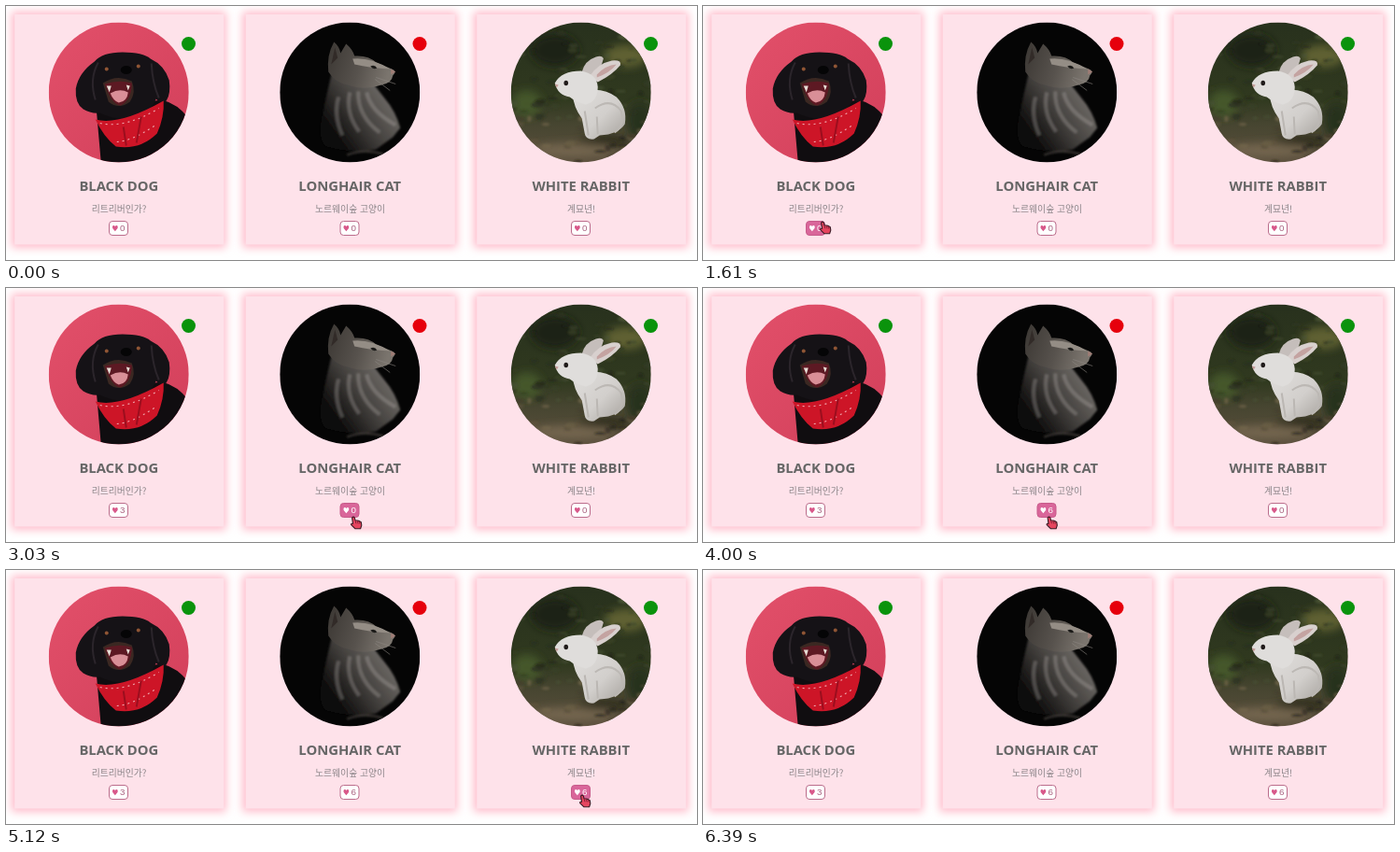
An HTML page for the animation above (6420 ms loop, 740 by 272 pixels).

```html
<!DOCTYPE html>
<html lang="ko">
<head>
<meta charset="utf-8">
<title>Pet cards</title>
<style>
  html, body { margin: 0; width: 100%; height: 100%; overflow: hidden; background: #fff; }
  svg { display: block; width: 740px; height: 272px; }
  text { text-anchor: middle; }
  .title { font: bold 14.8px "Open Sans", "Noto Sans", sans-serif; fill: #666; }
  .note { font: 9.8px "Noto Sans CJK KR", "Noto Sans CJK", "Noto Sans CJK JP", sans-serif; fill: #8a8488; }
  .box { fill: #fff; stroke: #bb6c8b; }
  .heart { fill: #d8588a; }
  .count { font: 9.8px "Liberation Sans", Arial, sans-serif; fill: #a9617f; }
  .hover .box { fill: #d9669a; stroke: #c75b8a; }
  .hover .heart, .hover .count { fill: #fff; }
</style>
</head>
<body>
<svg viewBox="0 0 740 272">
  <defs>
    <clipPath id="round"><circle r="75"/></clipPath>
    <filter id="glow" x="-15%" y="-15%" width="130%" height="130%"><feGaussianBlur stdDeviation="5"/></filter>
    <filter id="soft" x="-40%" y="-40%" width="180%" height="180%"><feGaussianBlur stdDeviation="5"/></filter>
    <filter id="fuzzy"><feGaussianBlur stdDeviation="1"/></filter>
    <linearGradient id="wall" x2="1" y2="1">
      <stop stop-color="#e2506a"/><stop offset="1" stop-color="#d23f5a"/>
    </linearGradient>
    <linearGradient id="fur" x1=".8" y1=".2" x2=".1" y2=".75">
      <stop stop-color="#75716d"/><stop offset=".5" stop-color="#45423f"/><stop offset="1" stop-color="#0b0a0a"/>
    </linearGradient>
    <linearGradient id="face" x2="1" y2=".2">
      <stop stop-color="#3b3733"/><stop offset=".55" stop-color="#57524d"/><stop offset="1" stop-color="#7b756e"/>
    </linearGradient>
    <linearGradient id="garden" x2="0" y2="1">
      <stop stop-color="#28311d"/><stop offset=".55" stop-color="#30391f"/>
      <stop offset=".72" stop-color="#464530"/><stop offset="1" stop-color="#5c503e"/>
    </linearGradient>
    <linearGradient id="white" x2="1" y2="1">
      <stop stop-color="#e0dedc"/><stop offset=".55" stop-color="#d2cfcc"/><stop offset="1" stop-color="#a5a19c"/>
    </linearGradient>

    <g id="dog">
      <rect x="-75" y="-75" width="150" height="150" fill="url(#wall)"/>
      <path d="M-24 18 L-19 75 H75 V28 Q63 12 46 8Z" fill="#100d10"/>
      <path d="M-26 -33 Q-18 -43 4 -43 Q26 -43 34 -36 Q49 -29 54 -13 Q56 1 51 9 Q45 13 40 7 Q34 22 16 28 Q-5 30 -20 22 Q-30 23 -38 18 Q-47 12 -46 -4 Q-43 -21 -26 -33Z" fill="#151216"/>
      <path d="M-22 -32 Q-32 -14 -25 8 M35 -31 Q36 -10 43 6" fill="none" stroke="#2b252b" stroke-width="2"/>
      <path d="M-17 -10 Q-2 -20 14 -12 Q19 0 12 10 Q0 19 -11 10Z" fill="#3b2822"/>
      <path d="M-15 -9 Q0 -14 14 -10 Q14 8 2 14 Q-8 13 -15 -9Z" fill="#5d1923"/>
      <path d="M-9 1 Q1 -5 10 0 Q9 10 0 11 Q-6 9 -9 1Z" fill="#d98f97"/>
      <path d="M-13 -7 L-10 0 L-8 -7 M8 -8 L10 -2 L12 -7" fill="#e6dcd4"/>
      <ellipse cx="8" cy="-24" rx="6" ry="4.5" fill="#050506"/>
      <g fill="#8f5534"><circle cx="-13" cy="-25" r="2"/><circle cx="21" cy="-28" r="2"/></g>
      <path d="M-25 29 Q0 36 48 9 Q49 26 41 44 Q23 62 -3 58 Q-16 48 -25 29Z" fill="#cd1527"/>
      <path d="M-20 33 Q7 39 43 17 M-2 53 Q14 52 38 36" fill="none" stroke="#f0a8ae" stroke-width="1.1" stroke-dasharray="2 4"/>
      <path d="M24 26 L19 54 M5 37 L8 57" stroke="#9c0e1e" stroke-width="2"/>
    </g>

    <g id="cat">
      <rect x="-75" y="-75" width="150" height="150" fill="#050505"/>
      <g filter="url(#fuzzy)">
        <path d="M-17 -31 Q-24 -2 -30 27 Q-35 50 -25 58 Q4 66 28 61 L46 48 L54 38 Q49 20 37 6 L26 -8 L10 -28Z" fill="url(#fur)"/>
        <path d="M0 0 Q-5 22 10 42 M9 -1 Q8 25 32 43 M18 0 Q22 20 49 35 M-12 5 Q-18 24 -8 46" fill="none" stroke="#b3aeaa" stroke-opacity=".32" stroke-width="4"/>
        <path d="M-3 67 Q15 60 36 66" fill="none" stroke="#3c3835" stroke-width="2"/>
      </g>
      <path d="M-23 -22 Q-25 -40 -17 -54 Q-11 -49 -10 -42 L-4 -52 Q3 -46 5 -39 Q20 -40 28 -32 L45 -25 Q51 -23 46 -18 Q45 -10 34 -8 Q17 -2 1 -7 Q-16 -10 -23 -22Z" fill="url(#face)"/>
      <path d="M-20 -30 L-16 -48 L-13 -37Z" fill="#322b28"/>
      <path d="M3 -36 Q22 -38 43 -25 Q22 -26 5 -30Z" fill="#948d85"/>
      <path d="M22 -28 Q27 -30 29 -26 Q25 -24 22 -28Z" fill="#1b1a18"/>
      <path d="M44 -25 L49 -22 L44 -19Z" fill="#a07d76"/>
      <path d="M28 -16 L49 -9 M27 -14 L43 -2" stroke="#8b8681" stroke-width=".6"/>
    </g>

    <g id="rabbit">
      <rect x="-75" y="-75" width="150" height="150" fill="url(#garden)"/>
      <g filter="url(#soft)">
        <ellipse cx="48" cy="-39" rx="23" ry="12" fill="#5f6030"/>
        <ellipse cx="-28" cy="-45" rx="25" ry="17" fill="#1a2112"/>
        <ellipse cx="-58" cy="12" rx="16" ry="14" fill="#44572a"/>
        <ellipse cx="63" cy="30" rx="14" ry="20" fill="#26301a"/>
        <ellipse cx="-10" cy="62" rx="45" ry="7" fill="#75664f"/>
        <ellipse cx="25" cy="52" rx="28" ry="5" fill="#272819"/>
      </g>
      <g id="leaves" filter="url(#fuzzy)"></g>
      <path d="M1 -22 Q4 -34 16 -38 Q23 -40 24 -36 Q22 -24 10 -17Z" fill="#c5bebb"/>
      <path d="M9 -17 Q18 -31 33 -34 Q44 -35 42 -29 Q34 -19 18 -11Z" fill="#d8d0ce"/>
      <path d="M17 -19 Q26 -29 38 -30 Q31 -21 17 -16Z" fill="#c4a3a1"/>
      <path d="M-9 2 Q20 -9 38 5 Q50 17 47 34 Q40 45 20 46 L14 50 Q5 51 4 44 L1 28 Q-8 16 -9 2Z" fill="url(#white)"/>
      <path d="M-28 -10 Q-21 -23 0 -23 Q17 -20 18 -6 Q18 10 5 13 Q-6 10 -12 5 Q-25 3 -28 -10Z" fill="#dfdddb"/>
      <path d="M15 17 Q32 5 43 20 Q47 36 36 43" fill="none" stroke="#bcb8b4" stroke-width="2"/>
      <path d="M4 20 L8 46 M17 26 L18 45" stroke="#bbb7b3" stroke-width="2"/>
      <ellipse cx="-16" cy="-10" rx="2.3" ry="2.7" fill="#201b1a"/>
      <path d="M-28 -9 L-24 -8 L-26 -5Z" fill="#c49b98"/>
    </g>
  </defs>
  <rect width="740" height="272" fill="#fff"/>
  <g id="cards"></g>
  <g id="cursor">
    <path d="M-1.4 1 Q0 -.8 1.4 1 L2 3.8 L4.5 4 L6.5 4.6 L8.3 5.8 L8.8 9.2 L7.6 12.8 H2 L-2.3 8.6 Q-2.8 6.8 -.5 7.4Z" fill="#e6455f" stroke="#3a1a24" stroke-width="1.1" stroke-linejoin="round"/>
    <path d="M2.2 4.2 L2.9 7.2 M4.5 4.6 L5 7.3 M6.5 5.4 L6.8 7.5" stroke="#5c1427" stroke-width=".7"/>
  </g>
</svg>
<script>
const LOOP = 6420, BUTTON_TOP = 230, BUTTON_BOTTOM = 247;

const pets = [
  { art: 'dog', title: 'BLACK DOG', note: '리트리버인가?', dot: '#0a930c', clicks: [2000, 2210, 2420] },
  { art: 'cat', title: 'LONGHAIR CAT', note: '노르웨이숲 고양이', dot: '#e6000c', clicks: [3300, 3550, 3730, 3820, 3910, 4000] },
  { art: 'rabbit', title: 'WHITE RABBIT', note: '계묘년!', dot: '#0a930c', clicks: [4390, 4480, 4570, 4660, 4760, 4850] }
];

// Fingertip positions: time, x, y.
const path = [
  [1450, 141, 268], [1610, 128, 231], [1720, 125, 234], [1850, 122.5, 238],
  [2850, 122.5, 238], [2940, 250, 262], [3030, 372, 245], [3300, 371, 244.5],
  [3520, 371, 244.5], [3550, 370, 244], [3730, 370.5, 245], [4030, 370.5, 245],
  [4200, 500, 264], [4360, 617, 241], [5579, 617, 241], [5580, 612, 264], [5610, 612, 264]
];

const centerX = i => 120.75 + 247.5 * i;

const cardMarkup = (pet, i) => `
  <g transform="translate(${centerX(i)} 0)">
    <rect x="-115" y="6" width="230" height="253" fill="#ffbccb" filter="url(#glow)"/>
    <rect x="-111.5" y="9" width="224" height="246.5" fill="#fee2ea"/>
    <g transform="translate(0 92.5)" clip-path="url(#round)"><use href="#${pet.art}"/></g>
    <circle cx="74.75" cy="40.5" r="7.5" fill="${pet.dot}"/>
    <text class="title" y="198">${pet.title}</text>
    <text class="note" x=".25" y="221">${pet.note}</text>
    <g class="button">
      <rect class="box" x="-10.25" y="230.5" width="20" height="15" rx="3.5"/>
      <path class="heart" d="M-3.9 241.2 L-6.6 238 Q-7.2 235.2 -5.4 235.1 Q-4.4 235.2 -3.9 236.3 Q-3.4 235.2 -2.4 235.1 Q-.6 235.2 -1.2 238Z"/>
      <text class="count" x="4" y="241.4">0</text>
    </g>
  </g>`;

// Scattered foliage above, earthy litter below.
function leafMarkup() {
  let seed = 7;
  const random = () => (seed = seed * 16807 % 2147483647) / 2147483647;
  return Array.from({ length: 110 }, () => {
    const x = random() * 150 - 75, y = random() * 150 - 75, ground = y > 28;
    const hue = ground ? 40 : 80, light = 9 + random() * (ground ? 33 : 20);
    const rx = 2 + random() * 5, ry = 1 + random() * 2.5;
    return `<ellipse cx="${x}" cy="${y}" rx="${rx}" ry="${ry}" fill="hsl(${hue} 22% ${light}%)" opacity=".6"/>`;
  }).join('');
}

document.getElementById('leaves').innerHTML = leafMarkup();
document.getElementById('cards').innerHTML = pets.map(cardMarkup).join('');
const buttons = [...document.querySelectorAll('.button')];
const counts = [...document.querySelectorAll('.count')];
const cursor = document.getElementById('cursor');

function cursorAt(t) {
  const next = path.findIndex(key => key[0] > t);
  if (next < 1) return null;
  const [t0, x0, y0] = path[next - 1], [t1, x1, y1] = path[next];
  const p = (t - t0) / (t1 - t0), e = p * p * (3 - 2 * p);
  return [x0 + (x1 - x0) * e, y0 + (y1 - y0) * e];
}

function draw(t) {
  const tip = cursorAt(t);
  cursor.setAttribute('visibility', tip ? 'visible' : 'hidden');
  if (tip) cursor.setAttribute('transform', `translate(${tip})`);
  pets.forEach((pet, i) => {
    const over = tip && Math.abs(tip[0] - centerX(i)) < 11 && tip[1] > BUTTON_TOP && tip[1] < BUTTON_BOTTOM;
    buttons[i].classList.toggle('hover', !!over);
    counts[i].textContent = pet.clicks.filter(time => time <= t).length;
  });
}

const start = performance.now();
function tick() {
  draw((performance.now() - start) % LOOP);
  requestAnimationFrame(tick);
}
tick();
</script>
</body>
</html>
```
